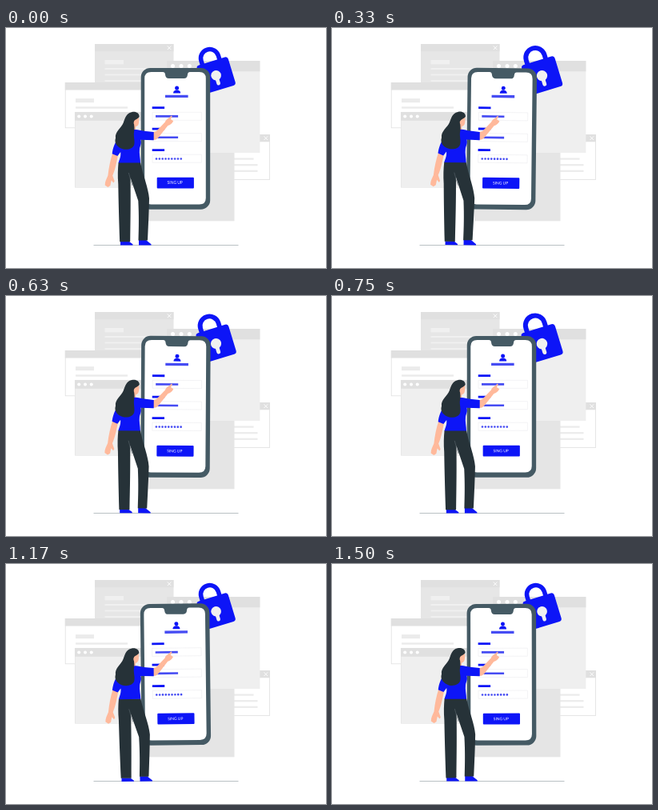
An HTML page for the animation above (1.54 s loop, 400 px wide and 300 px high).

```html
<!DOCTYPE html>
<html lang="en">
<head>
<meta charset="utf-8">
<title>Sign up</title>
<style>
  html, body { margin: 0; width: 100%; height: 100%; overflow: hidden; background: #fff; }
  svg { display: block; width: 100vw; height: 100vh; }
  .bar { fill: #e0e0e0; }
  .pane { fill: #efefef; }
  .line { fill: #ebebeb; }
  .pale { fill: #f0f0f0; }
  .card { fill: #fff; stroke: #e0e0e0; stroke-width: .8; }
  .white { fill: #fff; }
  .cross { stroke: #fff; stroke-width: .9; fill: none; }
  .blue { fill: #0d15f7; }
  .soft { fill: #464cf3; }
  .dark { fill: #263238; }
  .skin { fill: #ffb99b; }
  .field { fill: #fff; stroke: #ebebee; stroke-width: .6; }
</style>
</head>
<body>
<svg viewBox="0 0 400 300" xmlns="http://www.w3.org/2000/svg">
  <rect class="white" width="400" height="300"/>

  <!-- windows -->
  <g>
    <rect x="111" y="20" width="98.500" height="90" fill="#e6e6e6"/>
    <rect class="bar" x="111" y="20" width="98.500" height="9.300"/>
    <path class="cross" d="M201.800 22.500l4.600 4.600m0-4.600l-4.600 4.600"/>
    <rect class="pale" x="123.500" y="40" width="23.500" height="5.300"/>
    <rect class="pale" x="123.500" y="50" width="76" height="2"/>
    <rect class="pale" x="123.500" y="57.500" width="76" height="2"/>
    <rect class="pale" x="123.500" y="65" width="76" height="2"/>
  </g>
  <g>
    <rect class="card" x="74.200" y="68.400" width="98" height="56.400"/>
    <rect class="bar" x="73.800" y="68" width="98.800" height="9.500"/>
    <rect class="line" x="87" y="88.200" width="23" height="5"/>
    <rect class="line" x="87" y="98.300" width="65" height="2.400"/>
  </g>
  <g>
    <rect class="pane" x="86" y="105" width="100" height="94.300"/>
    <rect class="bar" x="86" y="105" width="100" height="10.800"/>
    <rect x="86.200" y="105.200" width="99" height="94" fill="none" stroke="#e0e0e0" stroke-width=".5"/>
    <circle class="white" cx="91.200" cy="110.400" r="2"/>
    <circle class="white" cx="99" cy="110.400" r="2"/>
    <circle class="white" cx="106.700" cy="110.400" r="2"/>
  </g>
  <g>
    <rect class="card" x="260" y="133.400" width="69.600" height="56"/>
    <rect class="bar" x="260" y="133" width="70" height="9.300"/>
    <path class="cross" d="M322.500 135.400l4.600 4.600m0-4.600l-4.600 4.600"/>
    <rect class="line" x="280" y="162.500" width="29.500" height="2.200"/>
    <rect class="line" x="280" y="170.100" width="34.500" height="2.200"/>
    <rect class="line" x="280" y="177.700" width="34.500" height="2.200"/>
  </g>
  <rect x="178" y="140" width="107.500" height="101.300" fill="#e5e5e5"/>
  <g>
    <rect class="pane" x="201" y="41" width="116.400" height="115"/>
    <rect class="bar" x="201" y="41" width="116.400" height="13.300"/>
    <circle class="white" cx="208.500" cy="47.500" r="2.500"/>
    <circle class="white" cx="219" cy="47.500" r="2.500"/>
    <circle class="white" cx="229.300" cy="47.500" r="2.500"/>
  </g>
  <path d="M109.500 271.500H290.500" stroke="#a9b1b5" stroke-width=".8"/>

  <g id="lock">
    <g transform="translate(262.600 59.200) rotate(-17)">
      <path d="M-12.500-16V-22.800A11.200 11.200 0 0 1 9.900-22.800V-16" fill="none" stroke="#0d15f7" stroke-width="5.600"/>
      <rect class="blue" x="-20.300" y="-18.500" width="40.800" height="37" rx="3.500"/>
      <circle cx="0" cy="0" r="6.300" fill="#f0f0f0"/>
      <path d="M0 2V10.500" stroke="#f0f0f0" stroke-width="4.600" stroke-linecap="round"/>
    </g>
  </g>

  <g id="scene">
    <!-- phone -->
    <rect x="168.700" y="49.900" width="86.500" height="176.800" rx="11.500" fill="#455a64"/>
    <path class="white" d="M181.500 55H196Q198.700 55 199 58Q199.300 63 203.500 63H222.500Q226.700 63 227 58Q227.300 55 230 55H241.600Q249.800 55 249.800 63V212.500Q249.800 220.500 241.600 220.500H181.500Q173.200 220.500 173.200 212.500V63Q173.200 55 181.500 55Z"/>
    <circle class="blue" cx="213.600" cy="75" r="2.500"/>
    <path class="blue" d="M209.100 81.500C209.100 78.500 211.300 77.500 213.600 77.500S218.100 78.500 218.100 81.500Z"/>
    <rect class="soft" x="199" y="83.700" width="28.600" height="3.300"/>
    <g id="form"></g>
    <rect class="blue" x="188.700" y="186.700" width="46.200" height="13.800" rx="1"/>
    <text x="211.200" y="195.300" text-anchor="middle" font-family="Lato, 'Open Sans', sans-serif" font-size="4.900" fill="#fff">SING UP</text>

    <!-- legs -->
    <path class="blue" d="M143 267H154L158.500 270.300V271.500H143Z"/>
    <path class="blue" d="M166 265H175L181.500 270.300V271.500H166Z"/>
    <path class="dark" d="M140.600 168H168C171.500 185 178 200 179 213C178.700 230 177.800 248 177 265.500H165.500C166 250 166.300 235 165.300 216L155.500 187C156 215 155.600 240 155.200 267.300H142.200C141.300 240 140.600 215 140.300 195C139.500 185 139.800 176 140.600 168Z"/>
    <path d="M153.300 181L155.800 190L158 197" fill="none" stroke="#5b676d" stroke-width=".6"/>

    <!-- upper body -->
    <g transform="translate(-.6 0)">
      <path class="skin" d="M134 156L140.500 159C138.500 170 137 177 133.800 184.500L136.300 191.500L135 193.500L132.300 190.500L131 197L128 199L124.300 196.500C124.300 192 126 189 128 184.500C129.200 174 131 165 134 156Z"/>
      <path class="skin" d="M184 130.200L188.500 129L199.500 117.500C200.500 113.800 204 113.500 207.300 109.500L208.400 110.400L206.500 114L209.800 116.200C208 119.500 206 121 203 122L191 137C189 139.500 187 140 184 139.700Z"/>
      <path class="skin" d="M157 113L166.300 110.500C167 115 167.200 121 164.600 122.600C163.500 123.200 162.800 123.300 162.500 124L163 129L157 133Z"/>
      <path class="blue" d="M159 127.500C164 126 168 128.300 173 128.700L185.300 130V140.300L169 139.800C170.300 145 168.300 147 167.600 151C166.800 157 168.600 163 168.600 168.600H141.200C142 165 144.500 161 143.800 155L140 160L133.300 157.200C134.200 150 136.500 143 141.500 137Z"/>
      <path class="dark" d="M167.200 111C167.400 106 162 103.800 157.500 105.300C150.500 107 149.500 113 147.300 118.500C145 124.500 136.300 130 137.600 137.500C135.200 145 141 149.500 146.500 151.300C152.500 152.800 159.300 151 160.800 146C162.100 140.500 159.500 135 160.800 129C161.800 125 160.300 121 160.600 117C161.500 114 164.500 114.500 167.200 111Z"/>
      <path class="skin" d="M160.300 117.500C161 115.800 163 116 162.800 118.300S161 120.800 160.300 119.800Z"/>
    </g>
  </g>
</svg>
<script>
const LOOP = 1540, PULSE = 500;
const byId = id => document.getElementById(id);
const rect = (cls, x, y, w, h) =>
  `<rect class="${cls}" x="${x}" y="${y}" width="${w}" height="${h}"/>`;

let form = "";
[98.3, 124.7, 151.2].forEach((y, row) => {
  form += rect("blue", 182.7, y, 15.4, 2.8) + rect("field", 183, y + 7, 61.4, 10);
  if (row < 2) form += rect("soft", 187, y + 10.8, 28.1, 2.6);
});
for (let i = 0; i < 9; i++) {
  form += `<circle class="soft" cx="${188 + i * 3.85}" cy="163.500" r="1.350"/>`;
}
byId("form").innerHTML = form;

const lock = byId("lock"), scene = byId("scene");

function draw(t) {
  const tilt = 0.65 * Math.sin(2 * Math.PI * t / LOOP);
  const beat = t < 2 * PULSE ? Math.sin(Math.PI * t / PULSE) ** 2 : 0;
  const size = 1 + 0.08 * beat;
  scene.setAttribute("transform", `rotate(${tilt} 190 138)`);
  lock.setAttribute("transform", `translate(264 53) scale(${size}) translate(-264 -53)`);
}

const start = performance.now();
function tick() {
  draw((performance.now() - start) % LOOP);
  requestAnimationFrame(tick);
}
draw(0);
requestAnimationFrame(tick);
</script>
</body>
</html>
```
